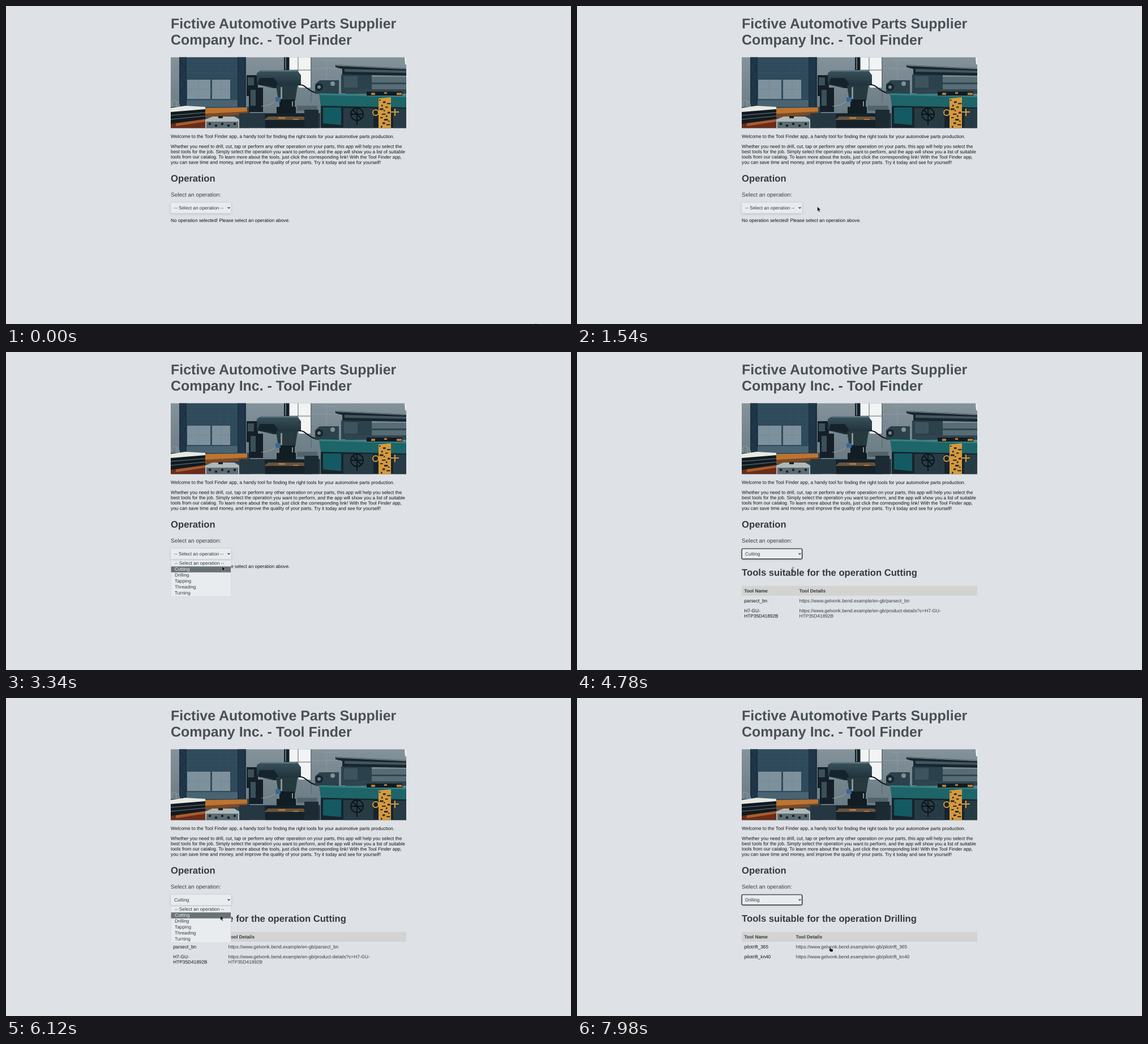
Animation of 998x561 px, one loop 8 s. Source, as an HTML page:

```html
<!DOCTYPE html>
<html lang="en">
<head>
<meta charset="utf-8">
<title>Tool Finder</title>
<style>
  html, body { margin: 0; width: 100%; height: 100%; overflow: hidden; background: #dee2e6; }
  svg { display: block; width: 100vw; height: 100vh; }
  /* the minute skew keeps baselines at fractional pixels */
  text {
    font: 8.317px "Liberation Sans", Arial, sans-serif; fill: #111; white-space: pre;
    text-rendering: geometricPrecision;
    transform: skewY(.032deg); transform-box: fill-box; transform-origin: center;
  }
  .h1 { font-size: 24.95px; font-weight: bold; fill: #495057; }
  .h2 { font-size: 16.63px; font-weight: bold; fill: #343a40; }
  .label { font-size: 9.98px; fill: #3b4147; }
  .th { font-weight: bold; fill: #343a40; }
  .soft { fill: #343a40; }
  .raised { filter: drop-shadow(0 1.2px 2.2px rgba(0, 0, 0, .17)); }
</style>
</head>
<body>
<svg id="stage" viewBox="0 0 998 561" preserveAspectRatio="none">
  <defs>
    <clipPath id="frame"><rect x="291" y="90.6" width="416" height="124.6"/></clipPath>
    <linearGradient id="wall" x2="0" y2="1"><stop stop-color="#84929a"/><stop offset="1" stop-color="#63757f"/></linearGradient>
    <linearGradient id="steel" x2="0" y2="1"><stop stop-color="#3a525c"/><stop offset="1" stop-color="#1b2d36"/></linearGradient>
  </defs>

  <g id="workshop" clip-path="url(#frame)">
    <path fill="url(#wall)" d="M291 90h416v126H291z"/>
    <!-- windows and columns -->
    <path fill="#2f4a5b" d="M306 90h118v90H306z"/>
    <path fill="#20374a" d="M306 90h13v88h-13zM409 90h15v92h-15z"/>
    <path fill="#7d919c" d="M320 130h41v34h-41zM364 130h32v34h-32z"/>
    <path fill="#4a6372" d="M319 166h90v14h-90z"/>
    <path stroke="#3d5767" stroke-width=".5" fill="none" d="M320 97h88M320 104h88M320 111h88M320 118h88M334 90v38M348 90v38M362 90v38M376 90v38M390 90v38"/>
    <path stroke="#647c89" stroke-width=".5" fill="none" d="M320 147h76M340 130v34M380 130v34"/>
    <path stroke="#172b3a" fill="none" d="M307 90v88M318 90v88M410 90v90M422 90v90M308 96l9 14-9 14 9 14-9 14 9 14"/>
    <path fill="#f1f4f2" d="M501 90h37v54h-20l-17-30z"/>
    <path stroke="#53656e" fill="none" d="M516 90v50M501 113h37M539 90v80"/>
    <path stroke="#94a1a6" stroke-width=".7" fill="none" d="M566 90v40M556 96h30M540 110h45"/>
    <!-- left benches -->
    <path fill="#2f4552" d="M291 178h140v38H291z"/>
    <path stroke="#8c999e" stroke-width="1.2" fill="none" d="M293 178v-9q4-6 8 0v9M301 169q4-2 6 9"/>
    <path fill="#bd7431" d="M338 180l88-1v11l-74 7z"/>
    <path fill="#7b4a27" d="M352 190l74-4v5l-74 6z"/>
    <path fill="#111a21" d="M291 182l61-3v26l-61 5z"/>
    <path fill="#e7e9e2" d="M291 180l26-4 35 2v4l-61 5z"/>
    <path stroke="#87949a" stroke-width=".8" d="M291 193l61-5M291 200l61-6"/>
    <path fill="#6a2c1b" d="M291 208l61-9v17h-61z"/>
    <path fill="#a95d2b" d="M300 207l52-7v4l-52 8z"/>
    <path fill="#b0b8b8" d="M352 200l13-5h38l9 5v16h-60z"/>
    <path fill="#5d6c73" d="M354 204h56v12h-56z"/>
    <g id="knobs" fill="#17222a"></g>
    <path fill="#17222a" d="M375 194h8v4h-8z"/>
    <!-- drill press -->
    <path fill="#253842" d="M412 189h143v27H412z"/>
    <path fill="#151f27" d="M491 90h9v25h-9zM425 122h20v37h-20zM429 144h25v43h-25z"/>
    <path fill="#5d757c" d="M493 90h2v22h-2z"/>
    <path fill="url(#steel)" d="M443 118l9-5h62l7 9v17l-20 6h-29l-29-7z"/>
    <path fill="#5f7880" d="M452 113h60l3 2.5h-65z"/>
    <path fill="#15242c" d="M448 127h25l7 9v10l-13-5-22-2z"/>
    <path fill="#3b515a" d="M427 126h11v14h-11zM432 148h9v28h-9z"/>
    <path fill="#26393f" d="M477 140h38l-4 27h-30z"/>
    <path fill="#111c23" d="M483 165h27v13h-27zM478 178h34v14h-34z"/>
    <path fill="#849298" d="M485 143h3v21h-3zM505 168h2v9h-2z"/>
    <path stroke="#a7a895" stroke-width=".8" fill="none" d="M451 177q23-2 29-15"/>
    <path fill="#386894" d="M476 161h9v8h-9z"/>
    <path fill="#15222a" d="M457 190h75l8 9v17h-82z"/>
    <path fill="#68533c" d="M463 195h62l7 6h-76z"/>
    <path fill="#b7743b" d="M481 196h12v3h-12zM507 199h10v2h-10z"/>
    <path fill="#52636b" d="M514 176h36v9h-36z"/>
    <path fill="#1c2a33" d="M527 183h25v33h-25z"/>
    <path stroke="#0d151a" stroke-width="2" fill="none" d="M518 139c13-1 14 14 38 15"/>
    <!-- lathe -->
    <path fill="#2b414b" d="M546 138l8-7h34v24h-42zM592 121h54v33h-54z"/>
    <path fill="#586c75" d="M646 125h61v26h-61z"/>
    <path fill="#30454f" d="M646 135h61v3h-61zM600 147h107v8H600z"/>
    <path fill="#3d545e" d="M597 124h24v20h-24z"/>
    <circle cx="553" cy="143" r="7" fill="#18252d"/><circle cx="553" cy="143" r="3" fill="#71848a"/>
    <circle cx="577" cy="137" r="4" fill="#81918f"/>
    <path fill="#17262f" d="M582 104l125 6v13l-113-2v-10l-12-3z"/>
    <path fill="#42575f" d="M598 111l109 3v4l-109-2z"/>
    <path stroke="#8a999c" d="M583 105l124 6"/>
    <path fill="#16242c" d="M556 176h151v40H556z"/>
    <path fill="#1d6568" d="M553 154l154 4v21l-151-3z"/>
    <path fill="#348283" d="M553 154l154 4v3l-152-4z"/>
    <path fill="#145a62" d="M560 179h32v31l-32-3z"/>
    <path fill="#273b44" d="M596 180h53v36h-53zM684 181h23v35h-23z"/>
    <path fill="#111b21" d="M637 151h63v7h-63z"/>
    <path fill="#bc7a38" d="M645 153h7v4h-7zM668 152h5v3h-5zM690 153h9v4h-9z"/>
    <g fill="none" stroke="#0b1318" stroke-width="1.8"><circle cx="620" cy="191" r="11"/><path d="M609 191h22M620 180v30M612 183l16 16"/></g>
    <path fill="#d59a3d" d="M658 163l22-2v55h-22z"/>
    <circle cx="653" cy="188" r="5" fill="none" stroke="#d59a3d" stroke-width="2"/>
    <path stroke="#d59a3d" stroke-width="2" d="M680 187h14M687 181v13"/>
    <g id="fittings" fill="#26262a"></g>
    <path fill="#eef1ee" d="M704 90h3v13h-2z"/>
  </g>

  <g id="page"></g>
  <g id="result">
    <rect x="291" y="412.6" width="416" height="17.5" fill="#d3d3d2"/>
  </g>
  <g id="select">
    <rect class="raised" x="291.2" y="347" width="106.3" height="18.4" rx="1.6" fill="#e9ecef"/>
    <rect id="ring" x="291.1" y="347" width="106.5" height="18.2" rx="1.8" fill="none" stroke="#101010" stroke-width="1.2"/>
    <path d="M391.5 354.9l2 2 2-2" fill="none" stroke="#222" stroke-width="1.1"/>
  </g>
  <g id="list">
    <rect x="291.3" y="367.2" width="106" height="64.4" fill="#e9ecef" stroke="#cfd3d6" stroke-width=".5"/>
    <rect id="highlight" x="291.6" width="105.4" height="10.45" fill="#6a7275"/>
  </g>
  <g id="cursor">
    <path id="arrow" d="M0 0v8.2l1.9-1.8 1.3 3 1.5-.6-1.3-3h2.6z" fill="#080808" stroke="#f4f4f4" stroke-width=".45"/>
    <path id="beam" d="M-1.8-4.6q1.8 0 1.8 1v7.2q0 1-1.8 1M1.8-4.6q-1.8 0-1.8 1M0 3.6q0 1 1.8 1" fill="none" stroke="#4b4f53" stroke-width=".75"/>
    <path id="hand" d="M.2-.2q.8-.5 1.3.3l.5 2.5 3.2.6q1 .3.9 1.4l-.4 2.8H1.6L-.7 4.7q-.3-1 .9-.8z" fill="#0a0a0a" stroke="#e8eaec" stroke-width=".25"/>
  </g>
</svg>
<script>
const LOOP = 8000, ROW = 10.5, LIST_TOP = 367.4;
const $ = id => document.getElementById(id);

function add(parent, tag, attrs, content = '') {
  const el = document.createElementNS('http://www.w3.org/2000/svg', tag);
  for (const key in attrs) el.setAttribute(key, attrs[key]);
  el.textContent = content;
  parent.appendChild(el);
  return el;
}
const write = (parent, x, y, content, cls = '') => add(parent, 'text', { x, y, class: cls }, content);
const show = (el, on) => { el.style.display = on ? '' : 'none'; };

for (let i = 0; i < 5; i++) add($('knobs'), 'circle', { cx: 360 + i * 11, cy: 208 + i % 2 * 3, r: 2.3 });
for (let i = 0; i < 16; i++) {
  add($('fittings'), 'rect', { x: 659 + i * 7 % 17, y: 165 + i * 3.1, width: 2.5 + i % 3 * 2, height: 2 + i % 2 });
}

const page = $('page');
[
  [39.5, 'Fictive Automotive Parts Supplier', 'h1'],
  [68.1, 'Company Inc. - Tool Finder', 'h1'],
  [232.9, 'Welcome to the Tool Finder app, a handy tool for finding the right tools for your automotive parts production.'],
  [250.5, 'Whether you need to drill, cut, tap or perform any other operation on your parts, this app will help you select the'],
  [259.9, 'best tools for the job. Simply select the operation you want to perform, and the app will show you a list of suitable'],
  [269.2, 'tools from our catalog. To learn more about the tools, just click the corresponding link! With the Tool Finder app,'],
  [278.6, 'you can save time and money, and improve the quality of your parts. Try it today and see for yourself!'],
  [309.8, 'Operation', 'h2'],
  [336.2, 'Select an operation:', 'label']
].forEach(([y, content, cls]) => write(page, 291.1, y, content, cls));
const hint = write(page, 291.1, 381, 'No operation selected! Please select an operation above.');

const result = $('result');
const heading = write(result, 291.1, 394.7, '', 'h2');
write(result, 295.2, 424.2, 'Tool Name', 'th');
const detailsHead = write(result, 494, 424.2, 'Tool Details', 'th');

const SITE = 'https://www.gelvonk.bend.example/en-gb/';
const tables = {
  Cutting: { x: 392.6, rows: [
    [441.8, 'parsect_bn', SITE + 'parsect_bn'],
    [459.3, 'H7-GU-', SITE + 'product-details?c=H7-GU-'],
    [468.6, 'HTP35D41892B', 'HTP35D41892B']
  ] },
  Drilling: { x: 386.6, rows: [
    [441.8, 'pilotrift_365', SITE + 'pilotrift_365'],
    [459.3, 'pilotrift_kn40', SITE + 'pilotrift_kn40']
  ] }
};
for (const table of Object.values(tables)) {
  table.group = add(result, 'g', {});
  for (const [y, name, link] of table.rows) {
    write(table.group, 295.2, y, name);
    write(table.group, table.x, y, link, 'soft');
  }
}

const options = ['-- Select an operation --', 'Cutting', 'Drilling', 'Tapping', 'Threading', 'Turning'];
const value = write($('select'), 297.1, 358.9, '', 'soft');
const items = options.map((name, i) => write($('list'), 298, 375.2 + i * ROW, name, 'soft'));

// time, chosen option, list open, rows loaded
const states = [
  [0, 0, false, false], [2600, 0, true, false],
  [3900, 1, false, false], [4120, 1, false, true], [5270, 1, true, true],
  [6770, 2, false, false], [7000, 2, false, true]
];

// time, x, y of the pointer
const path = [
  [460, 935.4, 559.3], [580, 893, 541], [740, 785, 493], [940, 640, 425], [1140, 562, 394], [1300, 540, 386.5],
  [1380, 505, 374], [1460, 455, 360], [1540, 424.5, 354], [1700, 402, 352.8], [1940, 392, 353.3],
  [3020, 392, 353.3], [3140, 388, 361], [3240, 384, 371], [3340, 381.6, 378], [3440, 380.6, 384], [3540, 380.6, 385.8],
  [3640, 380.6, 385.8], [3720, 381.7, 384.2],
  [4780, 381.7, 384.2], [4940, 384, 372], [5100, 386.3, 357],
  [5720, 386.3, 357], [5760, 386.2, 356.6], [5960, 383, 368], [6120, 378, 386], [6280, 375.8, 396],
  [7500, 375.8, 396], [7620, 385, 404], [7740, 420, 432], [7820, 438, 446], [7900, 444, 444.5], [7980, 446, 440]
];

function pointerAt(t) {
  const tick = Math.floor((t - 20) / 40) * 40 + 20;
  const next = path.findIndex(p => p[0] > tick);
  if (next === 0) return path[0].slice(1);
  if (next < 0) return path[path.length - 1].slice(1);
  const a = path[next - 1], b = path[next], u = (tick - a[0]) / (b[0] - a[0]);
  return [1, 2].map(i => a[i] + (b[i] - a[i]) * u);
}

function cursorKind(x, y, open, chosen) {
  if (open || !chosen) return 'arrow';
  if (y > 379 && y < 402) return 'beam';
  return x > 386 && y > 434 ? 'hand' : 'arrow';
}

function draw(t) {
  const [since, chosen, open, loaded] = states.filter(s => s[0] <= t).pop();
  const [x, y] = pointerAt(t);
  const name = options[chosen];

  value.textContent = name;
  show(hint, !chosen);
  show(result, chosen);
  show($('ring'), chosen && !open);
  heading.textContent = 'Tools suitable for the operation ' + name;
  detailsHead.setAttribute('x', loaded ? tables[name].x : 494);
  for (const key in tables) show(tables[key].group, loaded && key === name);

  const hovered = y >= LIST_TOP ? Math.floor((y - LIST_TOP) / ROW) : chosen;
  show($('list'), open);
  $('list').style.opacity = t - since < 50 ? .5 : 1;
  $('highlight').setAttribute('y', LIST_TOP + .4 + hovered * ROW);
  items.forEach((item, i) => { item.style.fill = i === hovered ? '#f3f4f5' : ''; });

  const kind = cursorKind(x, y, open, chosen);
  for (const id of ['arrow', 'beam', 'hand']) show($(id), id === kind);
  $('cursor').setAttribute('transform', `translate(${x} ${y})`);
}

const start = performance.now();
function loop() {
  draw((performance.now() - start) % LOOP);
  requestAnimationFrame(loop);
}
loop();
</script>
</body>
</html>
```
